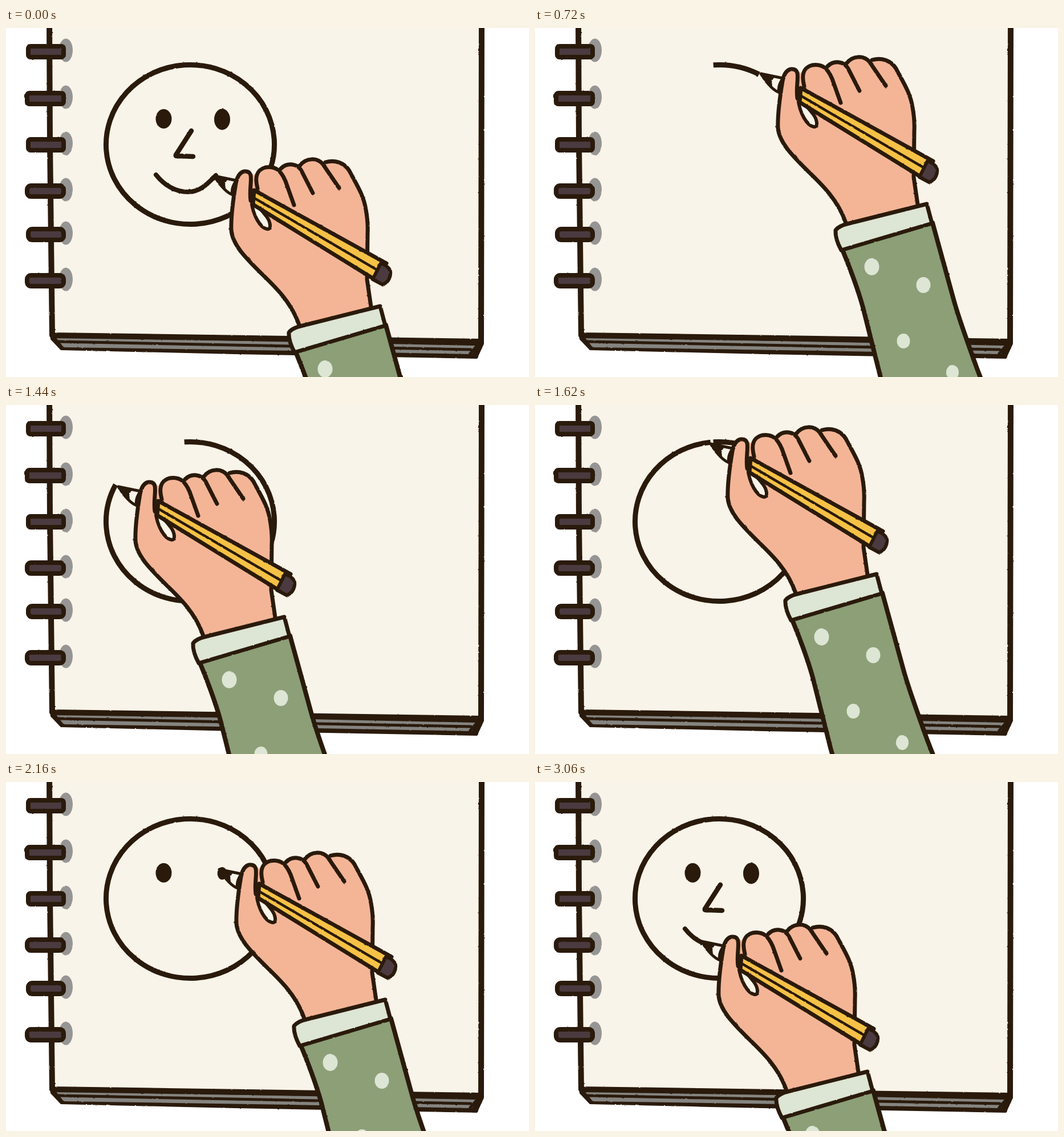
An HTML page for the animation above (3240 ms loop, 917 px wide and 611 px high).

```html
<!DOCTYPE html>
<html lang="en">
<head>
<meta charset="utf-8">
<title>Drawing a face</title>
<style>
  html, body { margin: 0; width: 100%; height: 100%; overflow: hidden; background: #fff; }
  svg { display: block; width: 100%; height: 100%; }
  .ink { fill: none; stroke: #2a1a0b; stroke-width: 7; stroke-linecap: round; stroke-linejoin: round; }
  .dark { fill: #2a1a0b; }
  .paper { fill: #f9f4e9; }
  .skin { fill: #f4b597; }
  .pale { fill: #dde5d4; }
</style>
</head>
<body>
<svg viewBox="0 0 917 611">
  <defs>
    <filter id="rough" filterUnits="userSpaceOnUse" x="-60" y="-60" width="1100" height="1000" color-interpolation-filters="sRGB">
      <feTurbulence type="fractalNoise" baseFrequency="0.16" numOctaves="2" seed="4"/>
      <feDisplacementMap in="SourceGraphic" scale="2" xChannelSelector="R" yChannelSelector="G"/>
    </filter>
  </defs>

  <g filter="url(#rough)">
    <path class="dark" d="M77 530 L78 545 L96 564 L400 571 L826 579 L838 553 L838 535Z"/>
    <path d="M87 541 L818 556 L826 556 L817 571 L500 565 L101 559Z" fill="#858480"/>
    <path class="ink" style="stroke-width:5" d="M92 549 L500 557 L815 563 M814 570 L827 555"/>
    <path class="paper" d="M76 -20 L82 537 L833 549 L833 -20Z"/>
    <path class="ink" style="stroke-width:10" d="M76 -20 L77 200 L81 538 L833 549 L834 -20"/>
    <g id="rings"></g>
  </g>

  <g filter="url(#rough)">
    <path id="head" class="ink" style="stroke-width:9;stroke-linecap:butt" pathLength="360"
      d="M312.7 64.8 A147.5 139.5 0 0 1 333.3 343.2 A147.5 139.5 0 0 1 312.7 64.8"/>
    <ellipse id="eyeL" class="dark" cx="276.5" cy="159" rx="14" ry="17"/>
    <ellipse id="eyeR" class="dark" cx="379" cy="160" rx="14" ry="18.5"/>
    <path id="nose" class="ink" style="stroke-width:8.5" pathLength="1" d="M325 180 L298 222 Q297 225 302 224 L328 225"/>
    <path id="smile" class="ink" style="stroke-width:8" pathLength="1" d="M263 257 C278 276 298 287 319 287 C340 287 352 274 368 258"/>
  </g>

  <g id="hand" filter="url(#rough)">
    <path class="skin" d="M513 520 C500 480 473 454 448 430 C422 404 397 380 395 354 C393 325 399 298 403 272
      C407 253 424 245 435 258 C441 246 452 242 466 244 Q476 246 482 247 C490 237 504 236 515 241
      C524 230 541 225 557 236 C576 230 593 236 602 250 C612 270 627 291 631 318 Q635 340 634 360 L633 440 L641 490Z"/>
    <path class="ink" d="M441 281 C435 258 441 248 455 244 C475 241 483 252 490 268 L505 310
      M482 246 C493 235 511 237 518 250 L538 289
      M515 241 C526 227 546 226 556 239 L584 280
      M560 235 C577 230 593 236 602 250 C612 270 627 291 631 318 Q635 340 634 360 L633 440 L640 488"/>
    <path class="ink" style="fill:#f9f4e9;stroke-width:6" d="M430 302 C433 329 446 350 458 352 C466 353 464 339 456 329 Q444 313 436 309Z"/>

    <path class="ink" style="fill:#f9f4e9;stroke-width:5" d="M365 259 L404 267 Q394 280 397 292 Q382 286 365 259Z"/>
    <path class="dark" d="M363 257 L391 264 Q382 269 385 281 Q374 277 363 257Z"/>
    <path class="skin" d="M398 295 C402 273 406 259 415 255 Q424 252 426 260 L423 300 L405 315Z"/>
    <path class="ink" d="M514 520 C500 480 473 454 448 430 C422 404 397 380 395 354 C394 325 400 290 403 272
      C406 257 412 252 418 251 C438 249 425 276 429 302"/>

    <path class="ink" style="fill:#f5c146" d="M435 284 L667 412 L646 440 L433 309Z"/>
    <path class="ink" style="stroke-width:4.5" d="M434 297 L648 422"/>
    <path class="ink" style="fill:#4b3a3f;stroke-width:6" d="M657 412 Q676 419 674 431 Q672 445 660 449 L643 440Z"/>

    <path class="ink" style="fill:#8c9f77;stroke-width:8" d="M507 565 Q532 625 544 668 L575 791 L600 880 L785 880 L745 778 Q713 690 704 658 L666 520Z"/>
    <path class="ink" style="fill:#dde5d4" d="M496 533 Q502 525 520 521 L656 487 L665 521 L506 568 Q495 548 496 533Z"/>
    <g class="pale">
      <ellipse cx="559.5" cy="597" rx="13" ry="15"/>
      <ellipse cx="650" cy="629" rx="12.5" ry="14"/>
      <ellipse cx="615" cy="727" rx="11.5" ry="13"/>
      <ellipse cx="701" cy="782" rx="11" ry="13"/>
    </g>
  </g>
</svg>

<script>
const STEP = 180;
const NIB = [365, 258];
const el = id => document.getElementById(id);

// Each pose: nib x, nib y, then head (degrees), left eye, right eye, nose, smile progress.
const done = [360, 1, 1, 1, 1];
const poses = [
  [365, 258, ...done],
  [430, 345, ...done],
  [null, 0, ...done],
  [315, 66, 3],
  [396, 79, 33],
  [470, 204, 94],
  [392, 327, 156],
  [250, 326, 214],
  [197, 142, 301],
  [308, 67, 358],
  [272, 152, 360, 0.6],
  [287, 161, 360, 1],
  [374, 152, 360, 1, 0.6],
  [390, 163, 360, 1, 1],
  [330, 181, 360, 1, 1],
  [299, 223, 360, 1, 1, 0.6],
  [331, 226, 360, 1, 1, 1],
  [292, 278, 360, 1, 1, 1, 0.3]
];

el("rings").innerHTML = [41, 123, 204, 285, 361, 442].map((y, i) => {
  const x = i % 2 ? 37 : 39;
  return `<ellipse cx="105" cy="${y - 2}" rx="12" ry="20.5" fill="#969594"/>
    <rect class="ink" style="fill:#4b3a3f;stroke-width:8" x="${x}" y="${y - 9}" width="${101 - x}" height="19" rx="${i > 2 ? 7 : 4}"/>`;
}).join("");

function trace(id, part, total = 1) {
  const line = el(id);
  line.style.visibility = part ? "visible" : "hidden";
  line.setAttribute("stroke-dasharray", part >= total ? "none" : `${part} ${total * 2}`);
}

function dot(id, size) {
  const eye = el(id), cx = eye.getAttribute("cx"), cy = eye.getAttribute("cy");
  eye.setAttribute("transform", `translate(${cx} ${cy}) scale(${size}) translate(${-cx} ${-cy})`);
  eye.style.visibility = size ? "visible" : "hidden";
}

function draw(step) {
  const [x, y, head = 0, left = 0, right = 0, nose = 0, smile = 0] = poses[step];
  trace("head", head, 360);
  dot("eyeL", left);
  dot("eyeR", right);
  trace("nose", nose);
  trace("smile", smile);
  const hand = el("hand");
  hand.style.visibility = x === null ? "hidden" : "visible";
  hand.setAttribute("transform", `translate(${x - NIB[0]} ${y - NIB[1]})`);
}

const start = performance.now();
let shown = -1;
function tick() {
  const step = Math.floor((performance.now() - start) / STEP) % poses.length;
  if (step !== shown) draw(shown = step);
  requestAnimationFrame(tick);
}
tick();
</script>
</body>
</html>
```
